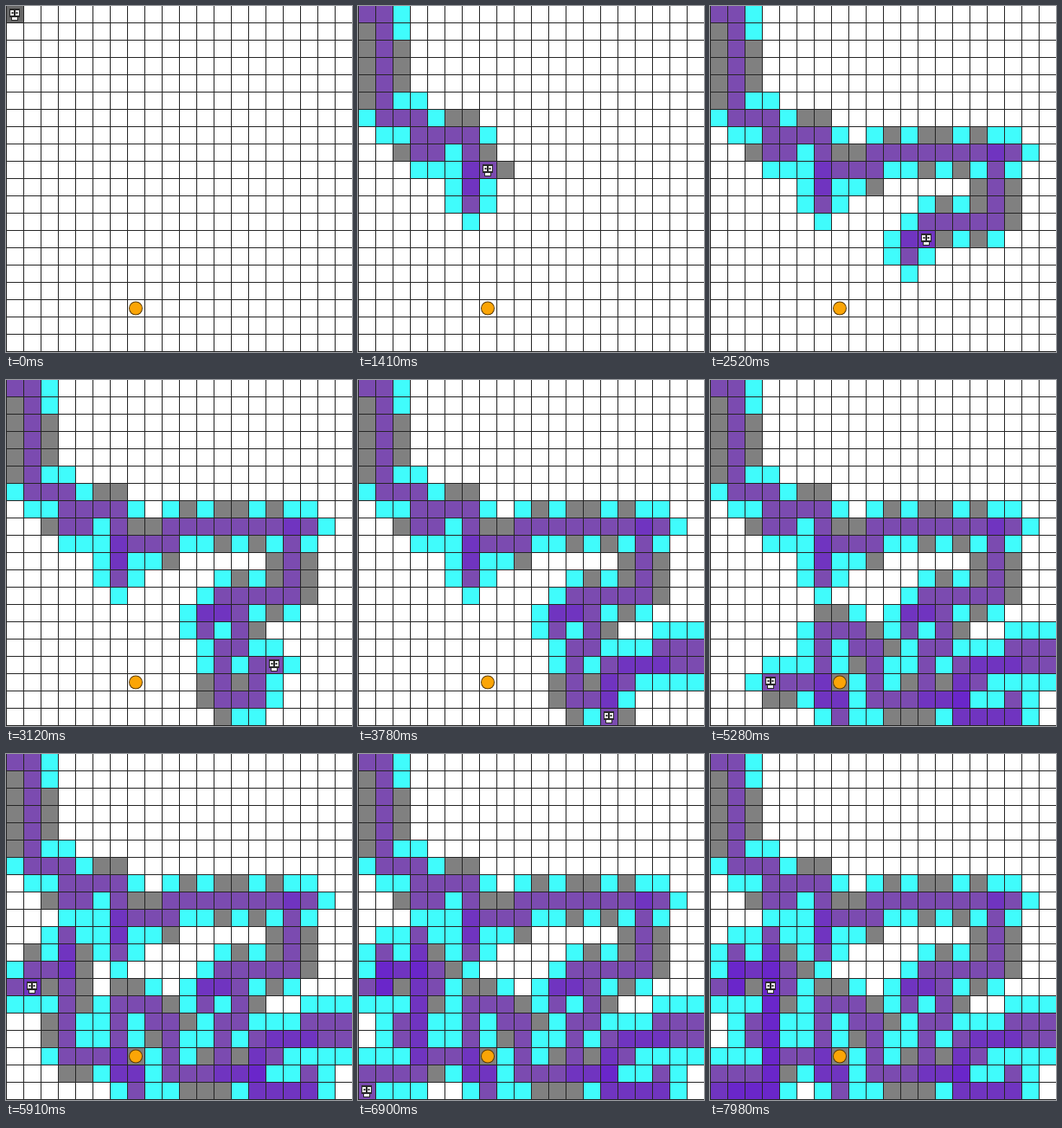
An HTML page with a canvas that plays this animation: 400 by 400 pixels, repeating every 8000 ms.

```html
<!DOCTYPE html>
<html>
<head>
<meta charset="utf-8">
<style>
  html, body { margin: 0; width: 100%; height: 100%; overflow: hidden; }
  canvas { display: block; }
</style>
</head>
<body>
<canvas id="stage" width="400" height="400"></canvas>
<script>
const ctx = document.getElementById('stage').getContext('2d');
const SIZE = 20, LOOP = 8000, TICK = 30;
const DIRS = { R: [1, 0], L: [-1, 0], D: [0, 1], U: [0, -1] };

// Legs of the walk: start time, end time, moves
const LEGS = [
  [341, 1410, 'R D6 R2 D2 R U R2 D4 U2 R'],
  [1410, 2520, 'R2 U R8 L D4 L4 D L D U R'],
  [2520, 3780, 'R D2 L D3 R2 U2 R5 U L2 D L2 D L D2'],
  [3780, 4650, 'R3 U D L3 U L5 U3 L U'],
  [4650, 5910, 'L2 D4 R D U L U L3 U7 D2 L2 D L R'],
  [5910, 7980, 'U D U2 D R3 D L D2 L D R D2 L3 D R3 L3 R3 U4 D4 U6']
];

// Columns of rough ground, row by row
const ROUGH = [
  [], [0], [0, 2], [0, 2], [0, 2], [0], [5, 6], [10, 12, 13, 15], [2, 7, 8],
  [8, 12, 14], [9, 15, 17], [1, 4, 13, 15, 17], [4, 5, 17],
  [2, 4, 6, 7, 13, 15], [4, 7, 9, 14], [2, 10], [2, 8], [7, 11, 13],
  [3, 4, 11], [10, 11, 12, 15]
];
const VISITED = ['#7b4bb0', '#7034c0', '#6a26ca'];

const steps = [];
let spot = [0, 0];
for (const [start, end, moves] of LEGS) {
  const list = [];
  for (const m of moves.split(' '))
    for (let i = 0; i < (+m.slice(1) || 1); i++) list.push(DIRS[m[0]]);
  list.forEach(([dx, dy], i) => {
    spot = [spot[0] + dx, spot[1] + dy];
    steps.push({ at: start + (end - start) * (i + 1) / list.length, x: spot[0], y: spot[1] });
  });
}

function rect(color, x, y, w, h) {
  ctx.fillStyle = color;
  ctx.fillRect(x, y, w, h);
}

function disc(color, x, y, r) {
  ctx.fillStyle = color;
  ctx.beginPath();
  ctx.arc(x, y, r, 0, 7);
  ctx.fill();
}

function cell(color, x, y) {
  rect(color, x * SIZE, y * SIZE - 1, SIZE, SIZE);
}

function robot(col, row) {
  const x = col * SIZE + 10, y = row * SIZE + 9;
  rect('#2a2a2a', x - 6, y - 6, 12, 10);
  rect('#2a2a2a', x - 4, y + 3, 8, 5);
  for (const side of [-1, 1]) {
    rect('#f4f4f4', x + side * 3 - 2, y - 4, 4, 6);
    rect('#2a2a2a', x + side * 2.5 - 1, y - 2, 2, 2);
  }
  rect('#f4f4f4', x - 3, y + 4, 6, 3);
}

function draw(time) {
  const t = Math.floor(time % LOOP / TICK) * TICK;
  const visits = new Map([['0,0', 1]]), seen = new Map();
  let now = { x: 0, y: 0 };

  rect('#fff', 0, 0, 400, 400);
  for (const s of steps) {
    if (s.at > t + 0.5) break;
    now = s;
    const key = s.x + ',' + s.y;
    visits.set(key, (visits.get(key) || 0) + 1);
    for (const [dx, dy] of Object.values(DIRS))
      seen.set((s.x + dx) + ',' + (s.y + dy), [s.x + dx, s.y + dy]);
  }
  for (const [x, y] of seen.values())
    if (ROUGH[y]) cell(ROUGH[y].includes(x) ? '#808080' : '#40fcfc', x, y);
  for (const [key, n] of visits)
    cell(VISITED[Math.min(n, 3) - 1], ...key.split(','));
  if (now.x + now.y === 0) cell('#686868', 0, 0);

  for (let p = 0; p <= 400; p += SIZE) {
    rect('#262626', 0, p - 1, 400, 1);
    rect('#262626', p, 0, 1, 400);
  }
  disc('#5c3c08', 150, 349.5, 8);
  disc('#fba506', 150, 349.5, 7);
  robot(now.x, now.y);
}

const began = performance.now();
function frame() {
  draw(performance.now() - began);
  requestAnimationFrame(frame);
}
frame();
</script>
</body>
</html>
```
